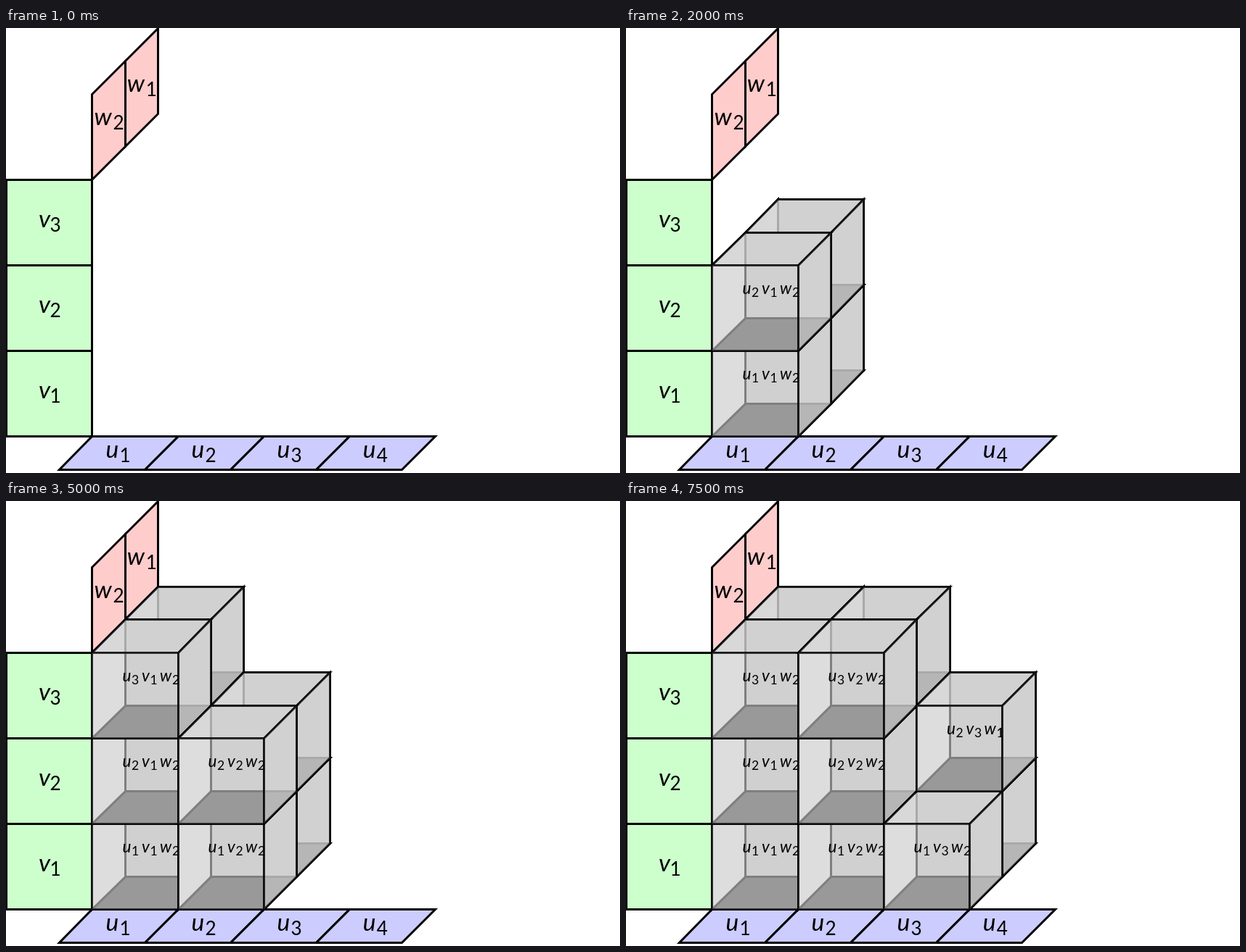
These frames come from a looping animation (846x614 px, 8 s). An HTML page with a canvas:

```html
<!DOCTYPE html>
<html lang="en">
<head>
<meta charset="utf-8">
<title>Stacking cubes</title>
<style>
  html, body { margin: 0; width: 100%; height: 100%; overflow: hidden; background: #fff; }
  canvas { display: block; }
</style>
</head>
<body>
<canvas id="stage" width="846" height="614"></canvas>
<script>
const ctx = document.getElementById('stage').getContext('2d');
const X0 = 118.9, Y0 = 563.7;   // shared corner of the three panels
const SIDE = 118.11, DEPTH = 45.47;
const STEP = 500, LOOP = 8000, ROWS = 3;
const BIG = 33.5, SMALL = 22.5;
const FAMILY = 'Lato, "Open Sans", sans-serif';

// Pixel centres keep the 3px lines crisp
const snap = v => Math.floor(v) + 0.5;

function face(points, fill, alpha = 1) {
  ctx.beginPath();
  points.forEach(([x, y]) => ctx.lineTo(snap(x), snap(y)));
  ctx.closePath();
  ctx.globalAlpha = alpha;
  ctx.fillStyle = fill;
  ctx.fill();
  ctx.stroke();
  ctx.globalAlpha = 1;
}

// Parallelogram from a corner and two edge vectors
function quad(x, y, [ax, ay], [bx, by]) {
  return [[x, y], [x + ax, y + ay], [x + ax + bx, y + ay + by], [x + bx, y + by]];
}

function symbol(letter, index, x, y, size, subX, drop) {
  ctx.fillStyle = '#000';
  ctx.font = `italic ${size}px ${FAMILY}`;
  ctx.fillText(letter, x, y);
  ctx.font = `${size * 0.78}px ${FAMILY}`;
  ctx.fillText(index, x + subX, y + drop);
}

const right = [SIDE, 0], up = [0, -SIDE], back = [DEPTH, -DEPTH];
const grey = v => `rgb(${v},${v},${v})`;

function panels() {
  for (let i = 0; i < ROWS; i++) {
    const y = Y0 - i * SIDE;
    face(quad(X0 - SIDE, y, right, up), '#cfc');
    symbol('v', i + 1, 45, y - 52.5, BIG, 15.5, 6);
  }
  for (let i = 0; i < 4; i++) {
    const x = X0 + i * SIDE;
    face(quad(x, Y0, right, [-DEPTH, DEPTH]), '#ccf');
    symbol('u', i + 1, x + 18.5, Y0 + 29.5, BIG, 19, 6);
  }
  for (let i = 0; i < 2; i++) {
    const x = X0 + i * DEPTH, y = Y0 - ROWS * SIDE - i * DEPTH;
    face(quad(x, y, back, up), '#fcc');
    symbol('w', 2 - i, x + 2.5, y - 75.5, BIG, 26, 6);
  }
}

function cube(col, row, layer) {
  const x = X0 + col * SIDE + layer * DEPTH;
  const y = Y0 - row * SIDE - layer * DEPTH;

  // Inner faces: bottom, back, left
  face(quad(x, y, right, back), grey(65));
  face(quad(x + DEPTH, y - DEPTH, right, up), grey(203));
  face(quad(x, y, back, up), grey(235));

  // Glassy outer faces: top, front, right
  face(quad(x, y - SIDE, right, back), grey(212), 0.8);
  face(quad(x, y, right, up), grey(212), 0.6);
  face(quad(x + SIDE, y, back, up), grey(212), 0.8);

  const base = y - 78.5;
  symbol('u', row + 1, x + 41.5, base, SMALL, 12.5, 4);
  symbol('v', col + 1, x + 68, base, SMALL, 11.5, 4);
  symbol('w', 2 - layer, x + 93, base, SMALL, 17, 4);
}

function draw(time) {
  const count = Math.floor((time % LOOP) / STEP);
  ctx.fillStyle = '#fff';
  ctx.fillRect(0, 0, 846, 614);
  ctx.strokeStyle = '#000';
  ctx.lineWidth = 3;
  panels();
  for (let n = 0; n < count; n++) {
    const stack = n >> 1;
    cube(Math.floor(stack / ROWS), stack % ROWS, 1 - n % 2);
  }
}

function tick() {
  draw(performance.now());
  requestAnimationFrame(tick);
}
tick();
</script>
</body>
</html>
```
